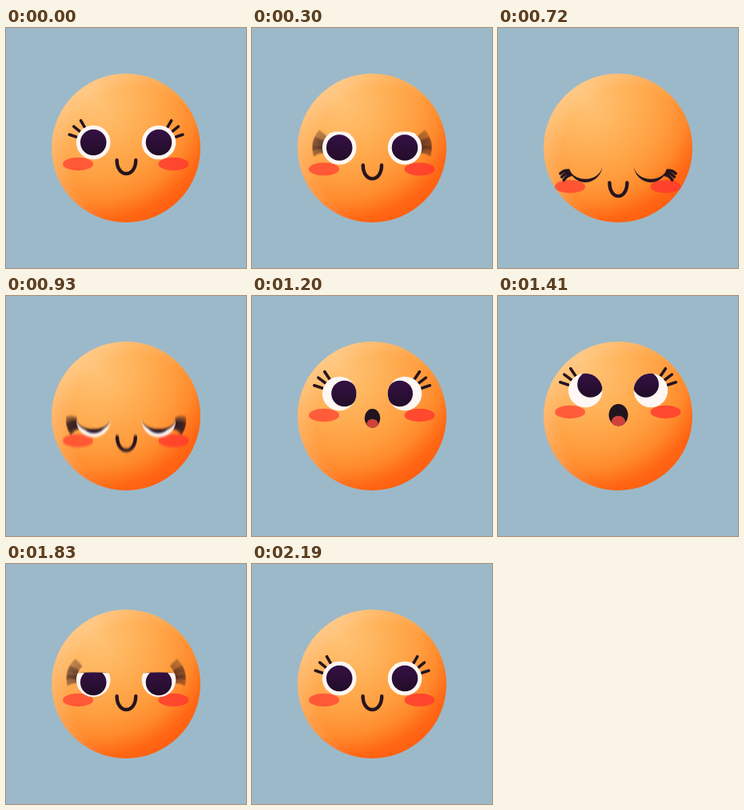
Write an HTML page that moves like this. It is 300x300 px and loops after 2220 ms.

```html
<!DOCTYPE html>
<html lang="en">
<head>
<meta charset="utf-8">
<title>Blinking face</title>
<style>
html, body { margin: 0; width: 100%; height: 100%; overflow: hidden; background: #9cb9c9; }
svg { display: block; width: 100%; height: 100%; }
</style>
</head>
<body>
<svg viewBox="0 0 300 300">
  <defs>
    <radialGradient id="skin" gradientUnits="userSpaceOnUse" cx="112" cy="92" r="165">
      <stop offset="0" stop-color="#ffc376"/>
      <stop offset=".3" stop-color="#ffb35a"/>
      <stop offset=".6" stop-color="#ff9d3e"/>
      <stop offset=".75" stop-color="#ff8a2c"/>
      <stop offset=".9" stop-color="#ff6614"/>
      <stop offset="1" stop-color="#ff5e10"/>
    </radialGradient>
    <radialGradient id="rim" gradientUnits="userSpaceOnUse" cx="165" cy="160" r="109">
      <stop offset=".78" stop-color="#fff" stop-opacity="0"/>
      <stop offset="1" stop-color="#fff" stop-opacity=".2"/>
    </radialGradient>
    <linearGradient id="iris" x1="0" y1="0" x2="0" y2="1">
      <stop offset="0" stop-color="#351044"/>
      <stop offset="1" stop-color="#220d28"/>
    </linearGradient>
    <filter id="blur" filterUnits="userSpaceOnUse" x="40" y="40" width="220" height="220" color-interpolation-filters="sRGB">
      <feGaussianBlur id="smear" stdDeviation="0 0"/>
    </filter>
    <clipPath id="eyeClip"><path id="eyeShape"/></clipPath>
    <clipPath id="mouthClip"><ellipse rx="12" ry="13.7"/></clipPath>
    <g id="eye">
      <g id="lashes" fill="none" stroke="#26141f" stroke-width="3.6" stroke-linecap="round"></g>
      <g id="ball" clip-path="url(#eyeClip)">
        <circle r="22" fill="#fff7f4"/>
        <circle id="pupil" r="16.3" fill="url(#iris)"/>
      </g>
      <path id="lid" fill="#26141f"/>
    </g>
  </defs>
  <rect width="300" height="300" fill="#9cb9c9"/>
  <circle cx="150" cy="150" r="93" fill="url(#skin)"/>
  <circle cx="150" cy="150" r="93" fill="url(#rim)"/>
  <g id="features">
    <g fill="#ff3a2f">
      <ellipse cx="90" cy="170" rx="19" ry="8.2" opacity=".7"/>
      <ellipse cx="209.5" cy="170" rx="19" ry="8.2" opacity=".82"/>
    </g>
    <use href="#eye" transform="translate(109.2 143)"/>
    <use href="#eye" transform="translate(191 143) scale(-1 1)"/>
    <path id="smile" fill="none" stroke="#26141f" stroke-width="4.4" stroke-linecap="round"/>
    <g id="mouth">
      <ellipse rx="12" ry="13.7" fill="#21141f"/>
      <ellipse cy="8.5" rx="8.8" ry="7.5" fill="#cf423c" clip-path="url(#mouthClip)"/>
    </g>
  </g>
</svg>
<script>
const LOOP = 2220, R = 21.3;
const SAMPLES = 9, SHUTTER = 14, LEAD = 30;
const $ = id => document.getElementById(id);
const set = (id, attrs) => {
  for (const k in attrs) $(id).setAttribute(k, attrs[k]);
};
const show = on => on ? "visible" : "hidden";
const mix = (a, b, k) => a + (b - a) * k;

// Eased 0 to 1 between two times.
function ramp(t, from, to) {
  const k = Math.min(1, Math.max(0, (t - from) / (to - from)));
  return (1 - Math.cos(Math.PI * k)) / 2;
}
// Rises from a to b, falls from c to d.
const pulse = (t, a, b, c, d) => ramp(t, a, b) - ramp(t, c, d);

const headY = t => 28.5 * pulse(t, 165, 600, 690, 1310)
  - 25 * pulse(t, 690, 1310, 1435, 1790)
  - 4 * pulse(t, 0, 120, 120, 280);
const lidAt = t => pulse(t, 290, 390, 900, 1010) + pulse(t, 1660, 1740, 1770, 1865);
// Lashes run ahead of the lid while it closes.
const lashAt = t => Math.max(lidAt(t), lidAt(t + LEAD));
const gazeIn = t => pulse(t, 900, 1050, 1640, 1760);
const gazeY = t => 3 * pulse(t, 1640, 1760, 1830, 1980) - 7.5 * pulse(t, 1200, 1400, 1640, 1760);
const mouthAt = t => pulse(t, 920, 1310, 1740, 1815);

function polar(radius, degrees) {
  const a = degrees * Math.PI / 180;
  return [-radius * Math.cos(a), -radius * Math.sin(a)];
}

// Three lashes fan out when open and fold together when shut.
function lashPath(p, gaze) {
  const fold = Math.pow(p, .75);
  let d = "";
  for (let i = 0; i < 3; i++) {
    const angle = mix(18 + (21 - 2 * gaze) * i, -35 + 8 * i, fold);
    const [x0, y0] = polar(31.5 + 1.5 * Math.max(fold, gaze), angle);
    const [x1, y1] = polar(22, angle);
    d += `M${x0} ${y0}Q${(x0 + x1) / 2} ${(y0 + y1) / 2 - 3 * fold} ${x1} ${y1}`;
  }
  return d;
}

for (let i = 0; i < SAMPLES; i++) {
  $("lashes").appendChild(document.createElementNS("http://www.w3.org/2000/svg", "path"));
}

function drawLashes(t) {
  const spread = Math.abs(lashAt(t + SHUTTER) - lashAt(t - SHUTTER));
  const moving = spread > .02;
  const alpha = 1 - .8 * Math.min(1, spread * 3);
  [...$("lashes").children].forEach((path, i) => {
    const offset = SHUTTER * (2 * i / (SAMPLES - 1) - 1);
    path.setAttribute("d", lashPath(lashAt(t + offset), gazeIn(t)));
    path.setAttribute("opacity", moving ? alpha : 1);
    path.setAttribute("visibility", show(moving || i === 0));
  });
}

function drawEye(t) {
  const p = lidAt(t);
  const end = R * (Math.pow(p, .4) - 1);
  const w = Math.sqrt(R * R - end * end);
  const sag = R * (2 * p - 1) - end;
  const arc = (bulge, toRight) => {
    const sweep = (bulge > 0) === toRight ? 0 : 1;
    return `A${w} ${Math.max(.01, Math.abs(bulge))} 0 0 ${sweep} ${toRight ? w : -w} ${end}`;
  };
  const shape = p < .001
    ? `M${-R} 0A${R} ${R} 0 0 0 ${R} 0A${R} ${R} 0 0 0 ${-R} 0Z`
    : `M${-w} ${end}A${R} ${R} 0 1 0 ${w} ${end}${arc(sag, false)}Z`;
  const sink = `translate(0 ${2.5 * Math.sin(Math.PI * p)})`;
  set("eyeShape", { d: shape });
  set("ball", { transform: sink, visibility: show(p < .97) });
  set("pupil", { cx: 6.3 * gazeIn(t), cy: gazeY(t) });
  set("lid", {
    d: `M${-w} ${end}${arc(sag + .5 * p, true)}${arc(sag - 3.6 * p * p, false)}Z`,
    transform: sink,
    visibility: show(p > .02)
  });
}

function drawMouth(t, drop) {
  const m = mouthAt(t), round = m > .35;
  const w = (11.8 - .03 * Math.max(0, drop)) * (1 - 1.5 * m);
  set("smile", {
    d: `M${150.4 - w} 165.2C${150.4 - w} 187.6 ${150.4 + w} 187.6 ${150.4 + w} 165.2`,
    visibility: show(!round)
  });
  set("mouth", {
    transform: `translate(150.5 173.8) scale(${m} ${mix(m, 1, .25)})`,
    visibility: show(round)
  });
}

function draw(t) {
  const drop = headY(t);
  const speed = Math.abs(headY(t + 5) - headY(t - 5)) / 10;
  const soft = Math.max(0, speed - .06) * 20;
  set("features", {
    transform: `translate(0 ${drop})`,
    filter: soft > .05 ? "url(#blur)" : "none"
  });
  set("smear", { stdDeviation: `${soft * .4} ${soft}` });
  drawLashes(t);
  drawEye(t);
  drawMouth(t, drop);
}

function tick(now) {
  draw(now % LOOP);
  requestAnimationFrame(tick);
}
draw(0);
requestAnimationFrame(tick);
</script>
</body>
</html>
```
